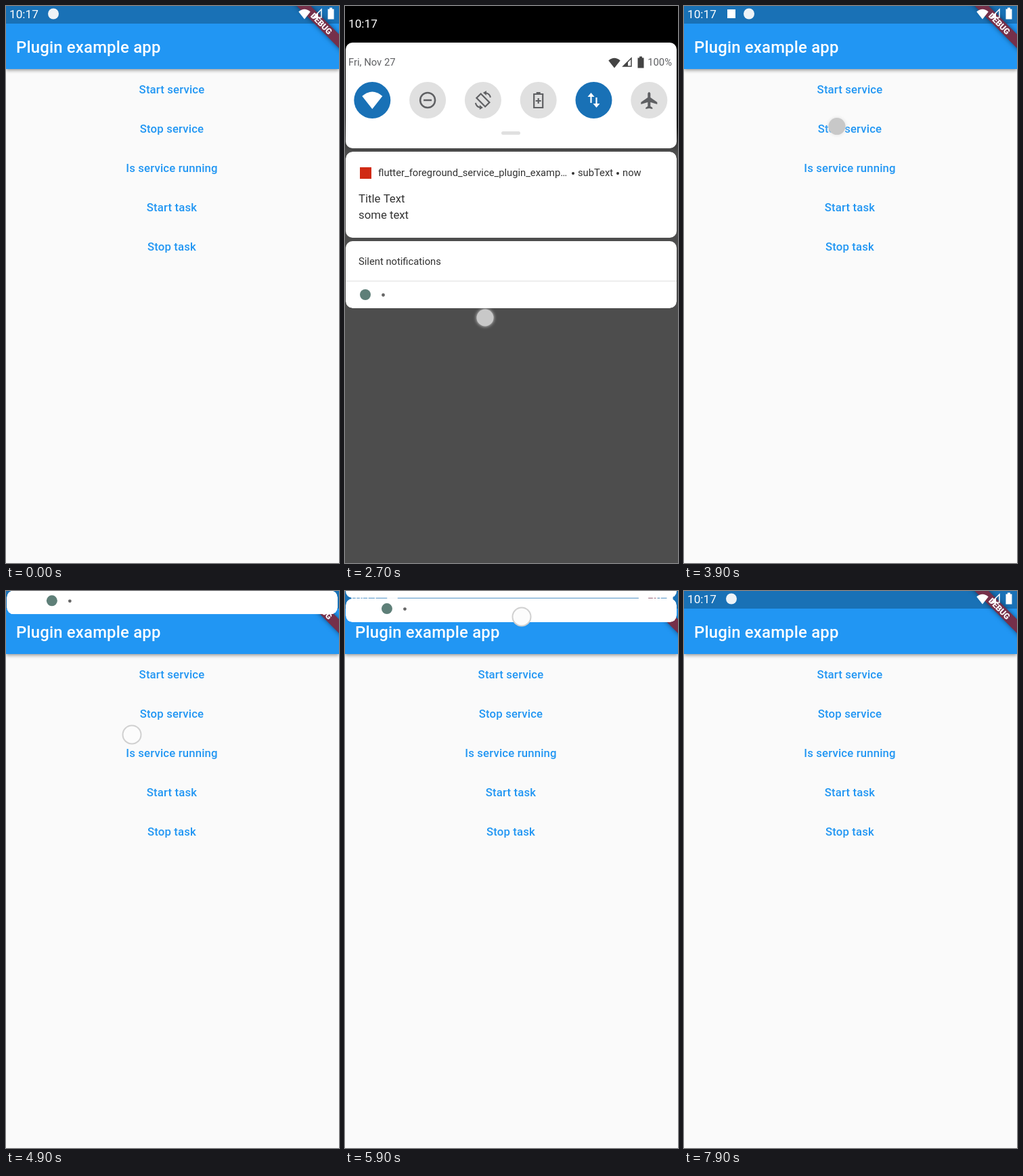
These frames come from a looping animation (492 by 822 pixels, 8 s). An HTML page with a canvas:

```html
<!DOCTYPE html>
<html>
<head>
<meta charset="utf-8">
<style>
html, body { margin: 0; width: 100%; height: 100%; overflow: hidden; background: #fafafa }
canvas { display: block }
</style>
</head>
<body>
<canvas id="stage" width="492" height="822"></canvas>
<script>
const g = document.getElementById('stage').getContext('2d');
const W = 492, H = 822, LOOP = 8000, STEP = 100;
const PAPER = '#fafafa', CARD = '#fff', INK = '#333', GREY = '#5f6063';
const BLUE = '#2196f3', DEEP = '#1971b6';

// The shade slides open from `start` and is shut again at `end`.
const SLIDE = 320;
const PULLS = [
  { start: 200, end: 900, full: 314 },
  { start: 2200, end: 3299, full: 446 },
  { start: 4865, end: 5947, full: 314 }
];
const TAPS = [1200, 4000, 7100];

// Key points of the pointer: time, x, y
const PATH = [
  [0, 230, -20], [450, 225, 330], [1200, 245, 125], [1900, 161, 240],
  [2200, 190, 8], [2700, 207, 460], [3100, 253, 81], [4000, 225, 181],
  [4600, 190, 8], [4900, 186, 212], [5600, 255, 330], [5900, 261, 38],
  [6300, 510, -20], [6600, 510, 700], [7100, 245, 240], [7800, -20, 850]
];

const clamp = v => Math.max(0, Math.min(1, v));
const mix = (a, b, k) => a + (b - a) * k;
const ease = k => k * k * (3 - 2 * k);
const openness = (p, t) => clamp(Math.min(t - p.start, p.end - t) / SLIDE);

function text(s, x, y, size, color, weight = 400, align = 'left', spacing = 0) {
  g.font = `${weight} ${size}px Roboto, sans-serif`;
  g.letterSpacing = spacing + 'px';
  g.textAlign = align;
  g.fillStyle = color;
  g.fillText(s, x, y + size * .355);
}

function rect(x, y, w, h, color, r = 0) {
  if (h <= 0) return;
  g.fillStyle = color;
  g.beginPath();
  g.roundRect(x, y, w, h, Math.min(r, h / 2));
  g.fill();
}

const card = (top, bottom) => rect(1, top, 489, bottom - top, CARD, 10);

function disc(x, y, r, color) {
  g.fillStyle = color;
  g.beginPath();
  g.arc(x, y, r, 0, 7);
  g.fill();
}

function draw(x, y, path, color, width, scale = 1, turn = 0) {
  g.save();
  g.translate(x, y);
  g.rotate(turn);
  g.scale(scale, scale);
  const p = new Path2D(path);
  g.strokeStyle = g.fillStyle = color;
  g.lineWidth = width;
  if (width) g.stroke(p);
  else g.fill(p);
  g.restore();
}

function faded(alpha, paint) {
  g.save();
  g.globalAlpha *= clamp(alpha);
  paint();
  g.restore();
}

const WIFI = 'M0 13L-15-6Q0-19 15-6Z';

function indicators(wifiX, y, color) {
  draw(wifiX, y + 1, WIFI, color, 0, .58);
  draw(wifiX + 19, y, 'M-6 6H6V-6Z', color, 1.5);
  draw(wifiX + 17, y + 2, 'M-4 4H3V-3Z', color);
  draw(wifiX + 39, y, 'M-4.5-6.5h2.5v-2h4v2h2.5v15h-9Z', color);
}

function banner() {
  g.save();
  g.translate(W, 0);
  g.rotate(Math.PI / 4);
  g.shadowColor = 'rgba(0,0,0,.5)';
  g.shadowBlur = 7;
  rect(-60, 29.6, 120, 14.4, '#75304a');
  g.shadowBlur = 0;
  text('DEBUG', 0, 36.8, 12.2, '#fff', 900, 'center');
  g.restore();
}

function app(running) {
  rect(0, 0, W, H, PAPER);
  g.save();
  g.shadowColor = 'rgba(0,0,0,.4)';
  g.shadowBlur = 5;
  g.shadowOffsetY = 2;
  rect(0, 0, W, 93, BLUE);
  g.restore();
  rect(0, 0, W, 26, DEEP);
  text('Plugin example app', 15, 61, 23.9, '#fff', 500, 'left', .18);
  ['Start service', 'Stop service', 'Is service running', 'Start task', 'Stop task']
    .forEach((s, i) => text(s, 245, 123 + i * 58, 16.75, BLUE, 500, 'center', .15));
  banner();
  text('10:17', 5, 12, 17.2, '#fff');
  if (running) rect(64, 5, 12, 13, '#fff');
  disc(running ? 96 : 70, 11.5, 8, '#eef3f7');
  indicators(441, 11, '#fff');
}

function tiles(y) {
  const x = i => 40.3 + i * 81.8;
  for (let i = 0; i < 6; i++) disc(x(i), y, 27, i % 4 ? '#e0e0e0' : DEEP);
  draw(x(0), y, WIFI, CARD);
  draw(x(1), y, 'M11 0A11 11 0 1 1-11 0A11 11 0 1 1 11 0M-6 0H6', GREY, 2.5);
  draw(x(2), y, 'M-4.5-9H4.5V9H-4.5Z', GREY, 2.2, 1, -Math.PI / 4);
  for (const turn of [0, Math.PI]) {
    draw(x(2), y, 'M-11 4Q-10 10-3 11', GREY, 2, 1, turn);
    draw(x(2), y, 'M-5 7V14L0 11Z', GREY, 0, 1, turn);
    draw(x(4), y, 'M-4 4V-7', CARD, 2.2, 1, turn);
    draw(x(4), y, 'M-9-5L-4-11L1-5Z', CARD, 0, 1, turn);
  }
  draw(x(3), y, 'M-6.5-9H6.5V11H-6.5ZM-3-11H3M-4 1H4M0-3V5', GREY, 2.2);
  draw(x(5), y, 'M-2-10Q0-14 2-10V-4L12 3V6L2 3V9L5 11V13L0 12L-5 13V11L-2 9V3L-12 6V3L-2-4Z', GREY);
}

function quickSettings(dy, shown) {
  faded(shown, () => {
    const fade = g.createLinearGradient(0, 165, 0, 215);
    fade.addColorStop(0, '#000');
    fade.addColorStop(1, 'rgba(0,0,0,0)');
    rect(0, 0, W, 215, fade);
    text('10:17', 5, 26 + dy, 17.2, '#fff');
  });
  card(54 + dy, 210 + dy);
  text('Fri, Nov 27', 5, 83 + dy, 14.8, GREY);
  indicators(398, 83 + dy, '#444');
  text('100%', 483, 83 + dy, 14.8, GREY, 400, 'right');
  tiles(139 + dy);
  rect(231, 185 + dy, 28, 5, '#e0e0e0', 2.5);
}

function notice(top, k) {
  const y = top + mix(31, 7, k);
  rect(22, top + mix(23, 16, k), 17, 17, '#d02a14');
  text('flutter_foreground_service_plugin_examp…', 49, y, 14.75, INK);
  disc(337, y + 1, 2, INK);
  text('subText', 344, y, 14.75, INK);
  disc(403, y + 1, 2, INK);
  text('now', 410, y, 14.75, INK);
  faded(1 - k * 1.5, () => {
    text('Title Text', 20, top + 69, 16.75, INK);
    text('some text', 20, top + 93, 16.75, INK);
  });
}

function shade(bottom, full) {
  const noted = full > 400;
  const open = clamp((bottom - 46) / (full - 46));
  const top = Math.min(215, bottom - (noted ? 62 : 35));
  const k = clamp((full - bottom) / (noted ? 169 : 63));
  const silent = bottom - 99;

  rect(0, 0, W, H, `rgba(0,0,0,${.69 * open})`);
  quickSettings((top - 215) * .98, open * 3);

  g.save();
  g.beginPath();
  g.roundRect(1, top, 489, bottom - top, 10);
  g.clip();
  if (noted) {
    card(top, mix(silent - 5, bottom, k));
    notice(top, k);
    faded(1 - k, () => card(silent, bottom));
  } else card(top, bottom);
  faded(1 - k * 1.6, () => {
    text('Silent notifications', 20, silent + 30, 14.75, INK);
    rect(1, silent + 58, 489, 2, '#eee');
  });
  // The silent icon glides towards its place in the status bar.
  const x = noted ? mix(96, 30, bottom / full) : mix(70, 30, clamp((bottom - 30) / 80));
  disc(x, bottom - 20, 8, '#5e7f78');
  disc(x + 26.5, bottom - 19.5, 2.4, '#666');
  g.restore();
}

function pointer(t, pressed) {
  const i = PATH.findIndex(p => p[0] > t);
  if (i < 0) return;
  const [t0, x0, y0] = PATH[i - 1], [t1, x1, y1] = PATH[i];
  const k = ease((t - t0) / (t1 - t0));
  const x = mix(x0, x1, k), y = mix(y0, y1, k);
  g.save();
  if (pressed) {
    g.shadowColor = '#ddd';
    g.shadowBlur = 5;
    disc(x, y, 12.5, '#c8c8c8');
  } else {
    disc(x, y, 14.5, '#d0d0d0');
    disc(x, y, 12.5, '#fcfcfc');
  }
  g.restore();
}

function frame(now) {
  const t = Math.floor(now % LOOP / STEP) * STEP;
  const pull = PULLS.find(p => openness(p, t) > 0);
  const open = pull ? openness(pull, t) : 0;
  app(t >= 1300 && t < 4100);
  if (pull) shade(pull.full * open, pull.full);
  pointer(t, open === 1 || TAPS.some(tap => Math.abs(t - tap) <= 100));
  requestAnimationFrame(frame);
}
requestAnimationFrame(frame);
</script>
</body>
</html>
```
